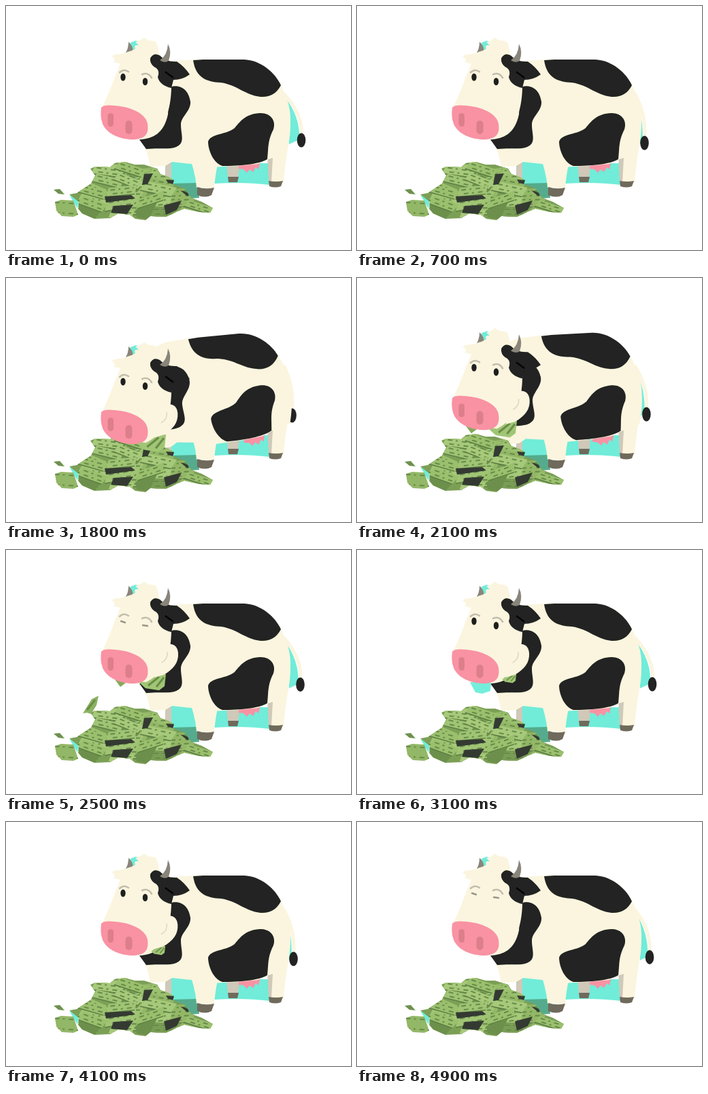
Write an HTML page that moves like this. It is 507 by 360 pixels and loops after 5 s.

```html
<!DOCTYPE html>
<html lang="en">
<head>
<meta charset="utf-8">
<title>Cow eating money</title>
<style>
html, body { margin: 0; width: 100%; height: 100%; overflow: hidden; background: #fff; }
svg { display: block; width: 100vw; height: 100vh; }
.cream { fill: #fbf5df; }
.black { fill: #222322; }
.cyan { fill: #70ecd9; }
.taupe { fill: #d0c8b8; }
.hoof { fill: #706a5c; }
.horn { fill: #89857a; }
.pink { fill: #f992a3; }
.line { fill: none; stroke: #c2beae; stroke-width: 2.6; stroke-linecap: round; }
.fold { fill: none; stroke: #dfd9c5; stroke-width: 1.6; stroke-linecap: round; }
</style>
</head>
<body>
<svg viewBox="0 0 507 360" xmlns="http://www.w3.org/2000/svg">
  <defs>
    <clipPath id="heap"><path d="M93 278L104 276L125 262L131 250L124 240L131 237L153 238L160 232L175 230L189 234L203 234L222 240L227 248L238 252L247 257L245 263L262 269L272 283L288 289L304 298L300 305L284 304L262 299L250 304L235 311L212 310L205 316L190 314L182 308L165 306L153 313L130 314L112 306L106 299L107 289Z"/></clipPath>
    <clipPath id="note"><path d="M72 289L81 286L99 287L106 308L99 311L82 310L74 302Z"/></clipPath>
  </defs>

  <g id="tail">
    <path id="gap" class="cyan"/>
    <path id="cord" fill="none" stroke="#fbf5df" stroke-width="5"/>
    <ellipse id="tuft" class="black" rx="6.3" ry="10.5"/>
  </g>

  <path class="cyan" d="M238 226H276L284 263H240ZM306 232H388V264Q350 259 306 262Z"/>
  <path fill="#55ab8b" d="M240 262L281 261L284 283L270 284Z"/>
  <path class="taupe" d="M234 226H243V262H234ZM324 232H344L341 253H326ZM384 220H394V260H386Z"/>
  <path class="hoof" d="M326 252H342L340 260H327Z"/>

  <path class="cream" d="M270 222H314C309 240 307 255 306 269L280 268C279 252 274 236 270 222Z"/>
  <path class="hoof" d="M281 267Q293 271 306 268L302 279Q293 284 281 279Z"/>
  <path class="cream" d="M385 205H415C412 224 409 243 408 260H390L392 224Z"/>
  <path class="hoof" d="M386 258Q397 260 407 258L404 266Q396 269 387 266Z"/>

  <g id="body">
    <path class="pink" d="M341 228H374L371 241L367 238L363 245L358 241L354 246L349 241L342 240Z"/>
    <path class="cream" d="M215 95Q230 82 246 81L275 79H350C375 80 398 100 404 117C412 132 419 150 418 172C418 190 416 202 412 218L386 226L370 233L340 236L300 238L272 233L244 230L234 236L212 237C209 222 206 209 198 197L215 150Z"/>
    <path class="black" d="M275 80L290 79H350C375 80 396 99 404 117C397 130 387 135 374 134C350 131 341 117 316 113C296 112 279 107 275 80Z"/>
    <path class="black" d="M297 200C301 188 324 190 336 180C346 168 353 159 374 158C390 158 397 170 393 182C384 200 386 209 384 226C371 234 342 236 318 236C305 232 297 213 297 200Z"/>
    <path class="black" d="M240 120C252 115 268 120 271 141C272 155 257 163 257 175C257 190 264 202 250 208C240 212 225 209 206 211L196 197C216 196 232 188 238 160Z"/>
  </g>

  <g id="pile">
    <path class="cyan" d="M94 280L108 277L105 299Z"/>
    <path fill="#6d924c" d="M70 271L79 270L86 278L77 277Z"/>
    <g id="notes" clip-path="url(#heap)"></g>
    <g id="loose" clip-path="url(#note)"></g>
  </g>

  <g id="drop"></g>

  <g id="head">
    <g id="bite"></g>
    <path id="flap"/>
    <path class="cyan" d="M183 54L191 51L199 56L195 66H185Z"/>
    <path class="horn" d="M176 69Q180 62 180 53Q187 58 187 70Z"/>
    <path class="cream" d="M155 74C164 69 172 72 178 68Q184 67 190 63Q187 57 195 58L190 53Q198 52 203 46Q205 51 219 52C224 56 223 64 226 72C240 85 245 105 243 122C242 150 236 180 206 195C190 195 150 175 141 152C146 138 155 120 160 104Q165 93 168 85L158 83Q163 79 155 74Z"/>
    <path class="black" d="M212 77Q217 68 226 73Q235 83 251 82Q262 89 270 101Q259 109 246 109L243 121Q226 117 223 105Q227 94 218 90Q211 85 212 77Z"/>
    <path d="M234 97L246 106" stroke="#050505" stroke-width="2.5"/>
    <path class="horn" d="M226 80Q237 73 238 56Q244 67 239 81Q233 85 226 80Z"/>
    <g id="cheek">
      <path class="cream" d="M228 143C238 136 252 137 253 152C254 166 246 176 232 184L218 188Z"/>
      <path class="fold" d="M237 151Q238 161 229 166"/>
    </g>
    <path class="line" d="M167 98Q173 92 180 97M200 101Q209 97 214 106"/>
    <g id="eyes" fill="#1e1f1e">
      <ellipse cx="172" cy="105" rx="3.7" ry="5.5"/>
      <ellipse cx="204.5" cy="111.5" rx="3.7" ry="5.5"/>
    </g>
    <path id="lids" class="line" style="stroke:#99968a;stroke-width:2.4" d="M169 105L175 107M201 111L208 112"/>
    <path class="pink" d="M140 150C143 145 158 146 174 149C192 153 206 162 208 174C210 187 206 196 188 197C169 197 149 190 142 174Q138 163 140 150Z"/>
    <g fill="#dd7f8b">
      <rect x="149.5" y="158" width="8.5" height="20" rx="4.2"/>
      <rect x="175.5" y="169" width="10" height="20" rx="5"/>
    </g>
  </g>
</svg>
<script>
const LOOP = 5000, STEP = 100;
const $ = id => document.getElementById(id);
const set = (id, name, value) => $(id).setAttribute(name, value);
const show = (id, on) => set(id, 'visibility', on ? 'visible' : 'hidden');

function smooth(t, from, to) {
  const u = Math.min(1, Math.max(0, (t - from) / (to - from)));
  return u * u * (3 - 2 * u);
}

// Linear interpolation through [time, value] pairs
function track(t, keys) {
  for (let i = 1; i < keys.length; i++) {
    const [a, x] = keys[i - 1], [b, y] = keys[i];
    if (t <= b) return x + (y - x) * (t - a) / (b - a);
  }
  return keys[keys.length - 1][1];
}

let seed = 23;
const rand = (a, b) => {
  seed = (seed * 16807) % 2147483647;
  return a + (b - a) * seed / 2147483647;
};

const GREENS = ['#a6c97a', '#9bc06d', '#92b766', '#7a9d55', '#a0c474'];

function bill(x, y, w, h, turn, fill) {
  return `<g transform="translate(${x} ${y}) rotate(${turn}) skewX(-20)">
    <rect x="${-w / 2}" y="${-h / 2}" width="${w}" height="${h}" fill="${fill}"/>
    <path d="M${-w * .42} ${-h * .24}H${w * .4}M${-w * .3} ${h * .2}H${w * .42}" fill="none" stroke="#668a49" stroke-width="2" stroke-dasharray="7 5 3 6"/>
    <path d="M${-w / 2} ${h / 2}H${w / 2}" stroke="#5d7f43" stroke-width="1.6"/></g>`;
}

function buildPile() {
  let out = '<path fill="#7c9f56" d="M65 225H310V320H65Z"/>';
  for (let i = 0; i < 38; i++) {
    const y = 238 + i * 1.9;
    const spread = 35 + (y - 238) * .9;
    out += bill(188 + rand(-spread, spread), y + rand(-5, 5), rand(32, 50), rand(12, 17),
      rand(-20, 25), GREENS[i % GREENS.length]);
  }
  out += `<path fill="#6c904b" d="M106 287L125 290L138 305L130 314L108 306ZM190 301L222 290L210 315L192 312ZM181 259L199 267L192 275L174 269Z"/>`;
  out += bill(150, 244, 44, 13, 8, GREENS[0]) + bill(183, 241, 42, 13, 18, GREENS[1])
    + bill(150, 258, 42, 13, 14, GREENS[4]) + bill(180, 258, 38, 13, 22, GREENS[0])
    + bill(128, 274, 40, 13, 16, GREENS[1]) + bill(224, 270, 46, 15, 12, GREENS[0])
    + bill(170, 273, 42, 13, -6, GREENS[4]) + bill(212, 286, 40, 13, -18, GREENS[1])
    + bill(127, 292, 38, 14, 20, GREENS[1]) + bill(284, 297, 40, 11, 18, GREENS[1]);
  return out + `<path fill="#343a32" d="M203 248L216 247L208 263L200 264ZM145 281L184 279L190 284L147 290ZM158 295L187 293L178 307L154 305ZM232 294L258 287L251 301L235 308ZM235 256L248 257L246 263L238 261ZM256 272L270 276L267 281Z"/>`;
}

$('notes').innerHTML = buildPile();
$('loose').innerHTML = bill(89, 299, 50, 34, 4, GREENS[2]);
$('drop').innerHTML = '<path fill="#8db262" d="M-12 12L1 -9L11 -14L8 0L0 13L-6 11Z"/><path d="M-6 7L6 -8" stroke="#6a8d49" stroke-width="3"/>';
$('bite').innerHTML = '<path fill="#a0c675" d="M-50 1L2 0L0 18L-8 24L-28 21Z"/><path d="M-24 17L-8 4M-12 19L-1 5" stroke="#6a8d49" stroke-width="3"/>';

const TAIL = [[0, 434], [300, 431], [700, 422.5], [1200, 419], [1800, 420.5], [2200, 427],
  [2500, 432.5], [2900, 434.5], [3100, 434], [3600, 431], [4100, 422.5], [4400, 420],
  [4800, 425], [4900, 430], [5000, 434]];
const BITE = [[1500, 1.1], [2500, 1], [3100, .55], [4100, .55], [4500, 0]];

function draw(t) {
  const down = smooth(t, 750, 1300) - smooth(t, 1850, 2400);
  set('body', 'transform', `translate(${-3 * down} ${-3 * down}) rotate(${-5.5 * down} 410 130)`);
  set('head', 'transform', `translate(0 ${48 * down})`);

  const x = track(t, TAIL), y = 198 + (434 - x) * .35;
  set('cord', 'd', `M408 129Q${x + 3} 160 ${x} ${y - 6}`);
  set('gap', 'd', `M408 132Q${x - 1} 163 ${x - 3} ${y - 1}L416 204Z`);
  set('tuft', 'cx', x);
  set('tuft', 'cy', y);

  const blink = (t >= 2400 && t < 2700) || t >= 4800;
  show('eyes', !blink);
  show('lids', blink);

  const chewing = t >= 1500 && t < 4500;
  const chew = Math.sin((t - 2500) / 600 * Math.PI * 2);
  show('cheek', chewing);
  set('cheek', 'transform', `translate(${chew * .8} ${chew * .6})`);
  show('bite', chewing);
  set('bite', 'transform', `translate(233 183) scale(${track(t, BITE)})`);

  const early = t >= 1900 && t < 2800;
  show('flap', early || (t >= 2900 && t < 3400));
  set('flap', 'd', early ? 'M160 191L176 196L168 202Z' : 'M166 195L197 196L196 208L184 212L174 210Z');
  set('flap', 'fill', early ? '#84a95b' : '#74eedb');

  const fall = (t - 2500) / 200;
  show('drop', t >= 2300 && t < 2800);
  set('drop', 'transform', `translate(${125 - 16 * fall} ${229 + 26 * fall + 3 * fall * fall}) rotate(${25 * fall})`);
}

function tick(now) {
  draw(Math.floor(now % LOOP / STEP) * STEP);
  requestAnimationFrame(tick);
}
draw(0);
requestAnimationFrame(tick);
</script>
</body>
</html>
```
